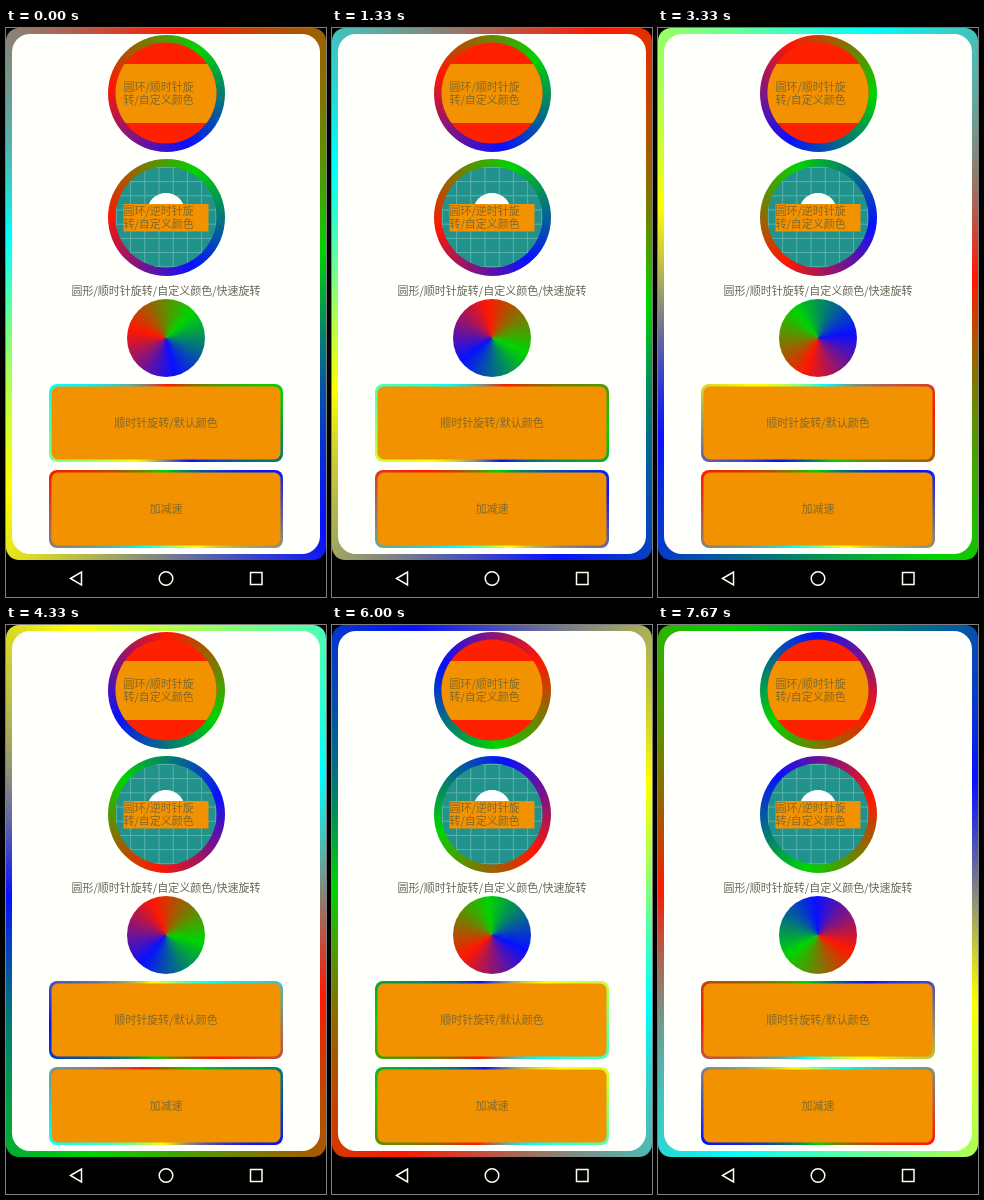
Write an HTML page that moves like this. It is 320 px wide and 569 px high and loops after 8 s.

```html
<!DOCTYPE html>
<html lang="zh">
<head>
<meta charset="utf-8">
<style>
  html, body { margin: 0; width: 100%; height: 100%; overflow: hidden; background: #000; }
  #stage { position: relative; width: 320px; height: 569px; overflow: hidden; }
  .spin { position: absolute; }
  svg { position: absolute; left: 0; top: 0; }
  text { font: 11px "Noto Sans CJK SC", "Noto Sans CJK", "Noto Sans", sans-serif; }
  .on-card { fill: #80692a; }
</style>
</head>
<body>
<div id="stage">
  <div class="spin" id="frame" style="left:0;top:0;width:320px;height:531.5px;border-radius:13px"></div>
  <div class="spin" style="left:6px;top:6px;width:308px;height:519.5px;border-radius:18px;background:#fffffc"></div>
  <div class="spin" id="ringA" style="left:101.5px;top:6.5px;width:117px;height:117px;border-radius:50%"></div>
  <div class="spin" id="ringB" style="left:101.5px;top:130.5px;width:117px;height:117px;border-radius:50%"></div>
  <div class="spin" id="disc" style="left:121px;top:271px;width:78px;height:78px;border-radius:50%"></div>
  <div class="spin" id="cardA" style="left:43px;top:356px;width:234px;height:78px;border-radius:8px"></div>
  <div class="spin" id="cardB" style="left:43px;top:442px;width:234px;height:78px;border-radius:8px"></div>

  <svg width="320" height="569">
    <defs>
      <clipPath id="clipA"><circle cx="160" cy="65" r="50.5"/></clipPath>
      <clipPath id="clipB"><circle cx="160" cy="189" r="50.5"/></clipPath>
    </defs>
    <g clip-path="url(#clipA)">
      <rect x="109" y="14" width="102" height="102" fill="#ff2000"/>
      <rect x="109" y="36" width="102" height="59" fill="#f29200"/>
    </g>
    <g clip-path="url(#clipB)">
      <rect x="109" y="138" width="102" height="102" fill="#22928c"/>
      <path id="grid" stroke="#62b6ac" stroke-width=".9"/>
      <circle cx="160" cy="184" r="19" fill="#fff"/>
      <rect x="117.5" y="176" width="85" height="27.5" fill="#f29200"/>
    </g>
    <g fill="#f29200">
      <rect x="45.5" y="358.5" width="229" height="73" rx="6.5"/>
      <rect x="45.5" y="444.5" width="229" height="73" rx="6.5"/>
    </g>
    <g class="on-card">
      <text x="117.5" y="62.5">圆环/顺时针旋</text>
      <text x="117.5" y="75.5">转/自定义颜色</text>
      <text x="117.5" y="187">圆环/逆时针旋</text>
      <text x="117.5" y="200">转/自定义颜色</text>
      <g text-anchor="middle">
        <text x="160" y="399.3">顺时针旋转/默认颜色</text>
        <text x="160" y="485.3">加减速</text>
      </g>
    </g>
    <text x="160" y="267.3" text-anchor="middle" fill="#666658">圆形/顺时针旋转/自定义颜色/快速旋转</text>
    <g fill="none" stroke="#fffff0" stroke-width="1.5">
      <path d="M64.5 550.5L75.5 544V557Z"/>
      <circle cx="160" cy="550.5" r="6.8"/>
      <rect x="244.5" y="544.5" width="11.5" height="12"/>
    </g>
  </svg>
</div>
<script>
const LOOP = 8000;
const RGB = "#ff1800, #00d400, #0810ff, #ff1800";
const FIVE = "#ff1800, #00d400, #0810ff, #ffff00, #00ffff, #ff1800";
const el = id => document.getElementById(id);

let lines = "";
for (let i = 0; i < 8; i++) {
  const d = 1.4 + 14.2 * i;
  lines += `M${109 + d} 138v102M109 ${138 + d}h102`;
}
el("grid").setAttribute("d", lines);

// The picture advances about three times a second.
const ticks = Array.from({ length: 24 }, (_, i) => Math.round(i * 100 / 3) * 10);

const along = (steps, t) => {
  let i = 1;
  while (i < steps.length - 1 && t > steps[i][0]) i++;
  const [t0, a] = steps[i - 1], [t1, b] = steps[i];
  return a + (b - a) * (t - t0) / (t1 - t0);
};

// Degrees turned, speeding up and slowing down once per period (seconds).
const turn = (t, period) => 180 * (1 - Math.cos(Math.PI * (t + 0.67) / period));

const pulse = [[0, 195], [1.33, 207], [2.33, 220], [3.33, 555], [5, 627], [6.67, 975], [7.67, 1099]];

// Each angle is where red lies, clockwise from the right.
const spins = [
  ["frame", FIVE, t => 270 + turn(t, 12.5)],
  ["cardA", FIVE, t => 270 + turn(t, 12.5)],
  ["cardB", FIVE, t => along(pulse, t)],
  ["ringA", RGB, t => 186 + turn(t, 15.5)],
  ["ringB", RGB, t => 184 - turn(t, 15.5)],
  ["disc", RGB, t => 187 + 3.4 * turn(t, 12.5)]
].map(([id, colors, angle]) => ({ style: el(id).style, colors, angle }));

let shown = -1;
const start = performance.now();

function draw(now) {
  const ms = Math.max(0, now - start) % LOOP;
  const tick = ticks.filter(s => s <= ms).pop();
  if (tick !== shown) {
    shown = tick;
    for (const { style, colors, angle } of spins) {
      style.background = `conic-gradient(from ${angle(tick / 1000) + 90}deg, ${colors})`;
    }
  }
  requestAnimationFrame(draw);
}
draw(start);
</script>
</body>
</html>
```
